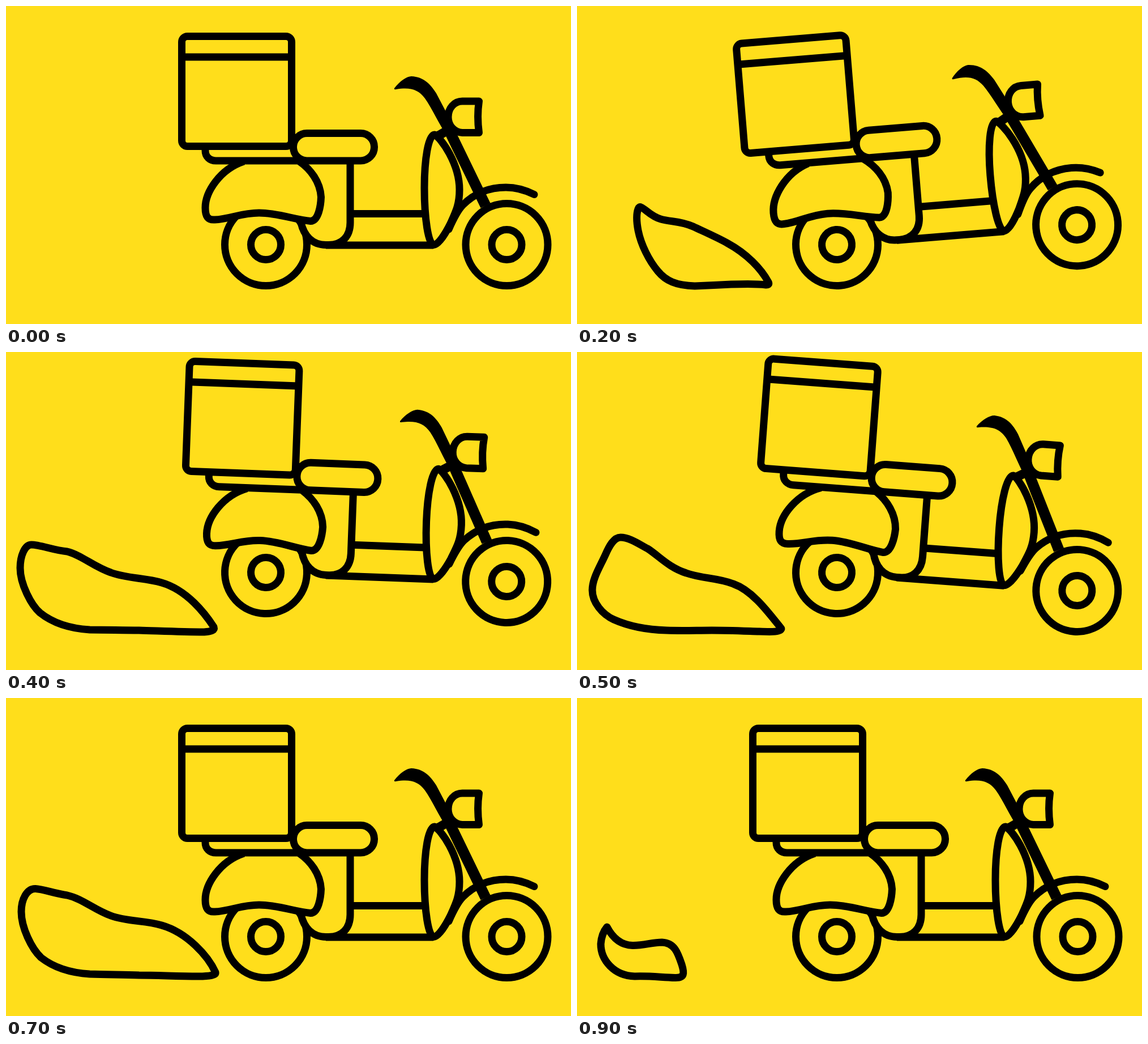
An HTML page with a canvas that plays this animation: 998 px wide and 561 px high, repeating every 1000 ms.

```html
<!DOCTYPE html>
<html lang="en">
<head>
<meta charset="utf-8">
<title>Scooter</title>
<style>
  html, body { margin: 0; width: 100%; height: 100%; overflow: hidden; background: #ffde1b; }
  canvas { display: block; width: 998px; height: 561px; }
</style>
</head>
<body>
<canvas id="stage" width="998" height="561"></canvas>
<script>
const ctx = document.getElementById('stage').getContext('2d');
const YELLOW = '#ffde1b', BLACK = '#000';
const STEP = 100;
const REAR = { x: 459, y: 421 }, FRONT = { x: 884.5, y: 421 };

const shape = d => new Path2D(d);

const parts = {
  engine: shape('M608 276V382C608 406 594 421.5 570 421.5H565C541 421.5 526 405 521 382'),
  fender: shape('M420 274C378 288 352 328 352 356C352 372 357 378 369 377C395 376 415 365 447 365C480 365 510 377 538 379.5C552 379 556 352 556.5 337C555 310 538 288 518 274'),
  rack: shape('M352 250V255C352 266 360 273 371 273H530'),
  lid: shape('M310 90H504'),
  floor: shape('M610 366.5H738M565 422H755'),
  shield: shape('M757 227C746 227 739 270 739 321C739 375 746 420 755 421.5C764 421 776 402 785 384C795 362 801 350 801 324C801 278 768 232 757 227Z'),
  neck: shape('M760 231L784 217'),
  guard: shape('M782 394C790 376 798 360 807 351C827 331 852 320 883 320C902 320 918 325 933 332.5'),
  lamp: shape('M806 168H835.5C833 185 833 205 835.5 223.5H806C792 223 781 211 781 196C781 180 792 168 806 168Z'),
  bar: shape('M686 145C695 133 708 124 716 124C738 125 750 138 760 154L781 194L797 228L778 228C765 208 752 180 740 163C728 147 714 143 689 147Q685 148 686 145Z'),
  fork: shape('M783 220L847 352')
};

// Per step: shift and lift of the rear wheel in px, body tilt in degrees
const poses = [[0, 0, 0], [0, 0, -2.35], [0, 0, -4.7], [0, 32, 0], [0, 32, 2.15],
               [0, 32, 4.3], [-1, 23, 2.95], [0, 0, 0], [0, 0, 0], [0, 0, 0]];

const puffs = [
  '',
  'M226 424C230 426 235 432 244 434C262 439 270 442 302 455C320 464 332 478 339 490C340 493 336 493 330 492C305 491 290 492 274 493C252 492 240 482 234 467C224 445 222 428 226 424Z',
  'M113 355C121 358 130 371 148 376C166 381 183 379 205 389C224 398 247 408 265 418C300 437 325 463 338 487C340 491 338 492 334 492C320 490 300 490 272 491C250 492 232 493 208 494C175 493 157 485 143 468C127 449 113 421 108 396C105 380 105 366 108 358C109 355 111 354 113 355Z',
  'M165 329C174 328 177 331 176 338C178 358 179 372 190 387C204 407 226 418 252 428C285 440 315 449 340 460C360 469 371 480 371 486C371 492 355 494 335 494C300 494 270 490 235 490C210 490 195 492 170 492C130 492 105 482 84 465C60 445 44 420 43.5 398C43 378 58 360 84 348C108 337 138 329 165 329Z',
  'M45 340C60 340 85 350 108 352C133 358 155 379 185 389C215 400 245 398 275 407C320 420 352 462 367 485C369 491 363 493 350 494C310 494 270 492 235 491C205 491 180 490 148 490C115 488 85 480 60 460C45 447 25 410 25 381C25 360 33 340 45 340Z',
  'M77 327C92 327 108 338 125 347C145 360 162 380 193 390C221 400 248 398 276 409C310 421 337 458 361 488C360 494 345 494 322 493C290 492 265 491 238 491C210 491 187 492 158 491C122 490 92 484 65 472C45 463 27 442 27 420C27 400 40 380 50 358C57 342 65 327 77 327Z',
  'M109 314.5C122 314 131 327 142 341C157 360 170 380 200 391C228 400 252 399 276 411C300 421 322 454 354 492C345 495 325 493 295 492C270 491 255 491 240 491C215 491 195 492.5 168 492.5C130 492 100 486 70 483C45 479 28 474 28 460C29 444 42 420 55 393C66 371 73 354 81 339C90 324 99 315 109 314.5Z',
  'M52 336.5C66 337 85 345 108 348C135 354 155 373 185 384C215 395 245 392 275 401C320 414 357 455 370 484C371 489 360 491 340 491C300 491 270 489 235 489C205 488 180 488 148 487C115 485 85 476 62 458C45 442 27 405 27 377C27 355 37 336 52 336.5Z',
  'M52 371C62 384 83 391 103 393C138 398 160 404 190 409C225 412 246 425 262 445C276 463 282 480 281 486C279 492 265 493 245 492C200 491 165 489 125 489C78 488 35 445 34 405C34 390 43 376 52 371Z',
  'M53 404C64 425 79 436 98 436.5C118 437 132 431 150 431C172 432 178 449 185 470C190 486 190 494 173 493.5C150 493 130 490 102 491C65 490 42 462 42 434C43 420 48 410 53 404Z'
].map(shape);

function line(path, width = 13) {
  ctx.lineWidth = width;
  ctx.stroke(path);
}

function solid(path) {
  ctx.fillStyle = YELLOW;
  ctx.fill(path);
  line(path);
}

function ring({ x, y }, r) {
  ctx.beginPath();
  ctx.arc(x, y, r, 0, Math.PI * 2);
  ctx.lineWidth = 13;
  ctx.stroke();
}

function wheel(hub) {
  ring(hub, 72.5);
  ring(hub, 26.5);
}

function roundBox(x, y, w, h, r) {
  const p = new Path2D();
  p.roundRect(x, y, w, h, r);
  solid(p);
}

function drawScooter() {
  ctx.lineCap = 'butt';
  wheel(REAR);
  wheel(FRONT);
  line(parts.floor);
  solid(parts.engine);
  solid(parts.fender);
  line(parts.rack);
  roundBox(310.5, 53.5, 194, 194, 10);
  line(parts.lid);
  roundBox(507.5, 224.5, 143, 48.5, 24);
  solid(parts.shield);
  line(parts.neck, 16);
  line(parts.fork, 19);
  solid(parts.lamp);
  ctx.fillStyle = BLACK;
  ctx.fill(parts.bar);
  ctx.lineCap = 'round';
  line(parts.guard);
}

function draw(now) {
  const i = Math.floor(now / STEP) % poses.length;
  const [shift, lift, tilt] = poses[i];
  ctx.fillStyle = YELLOW;
  ctx.fillRect(0, 0, 998, 561);
  ctx.strokeStyle = BLACK;
  ctx.lineJoin = 'round';
  line(puffs[i]);
  ctx.save();
  ctx.translate(REAR.x + shift, REAR.y - lift);
  ctx.rotate(tilt * Math.PI / 180);
  ctx.translate(-REAR.x, -REAR.y);
  drawScooter();
  ctx.restore();
}

const start = performance.now();
function tick() {
  draw(performance.now() - start);
  requestAnimationFrame(tick);
}
tick();
</script>
</body>
</html>
```
